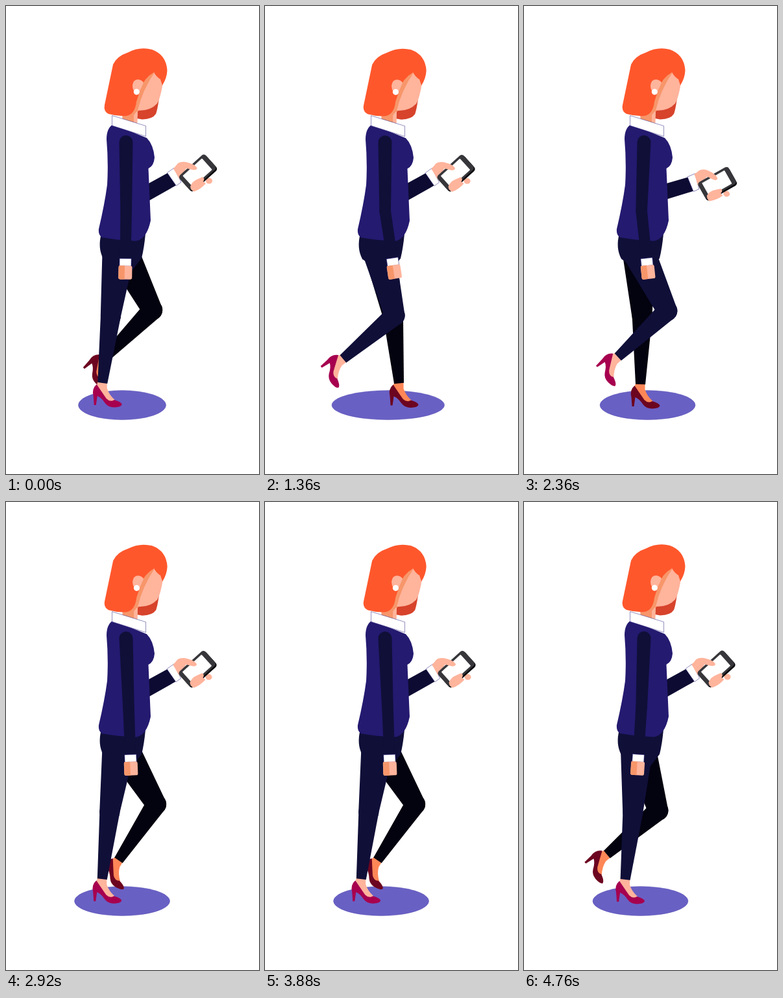
An HTML page for the animation above (4.8 s loop, 390 px wide and 720 px high).

```html
<!DOCTYPE html>
<html lang="en">
<head>
<meta charset="utf-8">
<title>Walking with a phone</title>
<style>
html, body { margin: 0; width: 100%; height: 100%; overflow: hidden; background: #fff; }
svg { display: block; width: 100vw; height: 100vh; }
.navy { fill: #100f38; }
.skin { fill: #ffb49c; }
.tan { fill: #f7966a; }
.white { fill: #fff; stroke: #2a2080; stroke-width: .5; }
</style>
</head>
<body>
<svg viewBox="0 0 390 720">
  <defs>
    <path id="thigh" d="M22 0 L15.5 104 A15.5 15.5 0 0 1 -15.5 108 L-29 4 Q-4 -26 22 0Z"/>
    <path id="shin" d="M-15.5 0 A15.5 15.5 0 0 1 15.5 0 L7.5 104 L-7.5 104Z"/>
    <path id="ankle" d="M-7 -3 L7 -3 L7 8 Q10 18 19 26 Q12 31 4 25 L-9 4Z"/>
    <path id="shoe" d="M-9 2 Q-17 9 -14 20 L-13 34 L-10 34 L-8 20 Q-2 22 4 31 Q9 37.500 18 37.500 Q29 37 30 33 Q29 29 18 26 Q12 30 6 24 Q-3 11 -9 2Z"/>
  </defs>
  <ellipse id="ground" cy="614" ry="22.500" fill="#6960c4" stroke="#5148b0" stroke-width=".5"/>

  <g id="phoneArm">
    <path fill="#0d0b32" d="M196 286 L249 257 L262 276 L216 302 L192 312Z"/>
    <path class="white" d="M248.500 256.500 L259 249 L270 271 L262.500 276.500Z"/>
    <ellipse class="skin" cx="313" cy="269" rx="5" ry="4.500"/>
    <path class="skin" d="M258 250 L265 243 L280 244 L272 262 L267 266Z"/>
    <g transform="translate(295.500 256.300) rotate(-42)">
      <rect x="-27" y="-13" width="54" height="30" rx="4.500" fill="#08080c"/>
      <rect x="-27" y="-15.500" width="54" height="30" rx="4.500" fill="#37373b"/>
      <rect x="-20.500" y="-12" width="40" height="23.500" rx="1" fill="#fff"/>
    </g>
    <path class="skin" d="M258 251 L264 243 Q268 239 277 240 Q291 243 294.500 249 Q294 254 285 251.500 Q277 248 272 252 L265 258Z"/>
    <path class="skin" d="M284 278 Q286 270 296 266 L303 263 Q307 266 304 270 L308 273 Q300 282 290 285.500 Q285 284 284 278Z"/>
  </g>

  <g id="far" fill="#03020f"></g>
  <g id="near" class="navy"></g>

  <g id="body">
    <path class="navy" d="M147 350 L215 350 Q213 372 209 388 L192 410 Q170 405 150 389 Q141 372 147 350Z"/>
    <path fill="#241a70" d="M165 182 Q155 188 155 205 Q158 240 156 275 Q152 305 143 343 Q142 352 148 356 Q170 360 200 361.500 Q217 359 223 330 L219.500 250 Q228 246 229 233 Q227 213 217 203Z"/>
    <g id="arm">
      <path class="navy" d="M-10.500 0 A10.500 10.500 0 0 1 10.500 0 L8.800 106 A8.800 8.800 0 0 1 -8.800 106Z"/>
      <g id="forearm">
        <path class="navy" d="M-8.800 0 A8.800 8.800 0 0 1 8.800 0 L8.300 75 L-8.300 75Z"/>
        <rect class="white" x="-9" y="73" width="18" height="11.500"/>
        <rect class="skin" x="-10.500" y="84" width="21" height="21" rx="2.500"/>
        <path class="tan" d="M-1 84 L-1 105 L-8 105 Q-10.500 105 -10.500 102 L-10 84Z"/>
      </g>
    </g>
  </g>

  <g id="head">
    <path fill="#d7432b" d="M203 150 L237 134 Q234 158 231 166 Q226 174 210 174.500 L202 173Z"/>
    <path class="tan" d="M179 166 L197 158 L203 158 L202 184 L180 180Z"/>
    <path class="skin" d="M197 168 L203 160 L202 184 L197 182Z"/>
    <path class="tan" d="M228 101 Q200 112 196 163 L204 162 L230 120Z"/>
    <path class="skin" d="M229 102 L242 118 Q238 142 233 150 Q222 162 203 160.500 Q210 130 229 102Z"/>
    <path fill="#ff572c" d="M165 90 Q171 77 188 71.500 Q206 62 225 67 Q247 75 248.500 99 Q248 111 241 122 L238 113 Q231 108 228 102 Q212 111 207 129 L201 147 Q199 166 186 169 Q172 170 158 166 Q150 162 152 152Z"/>
    <path class="skin" d="M195 122 Q196 113 204 113 Q210 114 212 118 L205 134 Q195 134 195 122Z"/>
    <circle cx="201.300" cy="132" r="4.600" fill="#fff"/>
  </g>
  <path id="collar" class="white" d="M163.500 168.500 L215.500 184.500 L215.500 200.500 L163.500 184Z"/>
</svg>
<script>
const LOOP = 4800, STEP = 960, FRAME = 40;
const FAR_LAG = 510;
const THIGH = 106, SHIN = 104;
const $ = id => document.getElementById(id);
const wave = (t, peak, period = STEP) => Math.cos(2 * Math.PI * (t - peak) / period);

// Key poses of one stride: [time, degrees], forward is positive
const thighKeys = [[0, -9], [100, -10.5], [270, -14], [400, 12], [450, 25.5], [600, 32], [850, 9.5], [920, -5.5]];
const shinKeys = [[0, -7], [100, -9], [300, -56], [400, -50], [450, -45], [600, -1.7], [700, 11], [850, 5], [920, -6.5]];

// Smooth periodic curve through the keys
function curve(keys, t) {
  const n = keys.length;
  const at = i => {
    const [time, value] = keys[(i + n) % n];
    return [time + Math.floor(i / n) * STEP, value];
  };
  let i = n - 1;
  while (keys[i][0] > t) i--;
  const [a, b, c, d] = [at(i - 1), at(i), at(i + 1), at(i + 2)];
  const h = c[0] - b[0], u = (t - b[0]) / h;
  const m = (c[1] - a[1]) / (c[0] - a[0]) * h;
  const k = (d[1] - b[1]) / (d[0] - b[0]) * h;
  const rise = c[1] - b[1];
  return b[1] + u * (m + u * (3 * rise - 2 * m - k + u * (m + k - 2 * rise)));
}

function makeLeg(id, skin, shoe) {
  $(id).innerHTML = `<g><use href="#ankle" fill="${skin}"/><use href="#shoe" fill="${shoe}"/></g>
    <use href="#shin"/><use href="#thigh"/>`;
  return [...$(id).children];
}
const nearLeg = makeLeg("near", "#ffb49c", "#a6004f");
const farLeg = makeLeg("far", "#ff8757", "#6c0520");

const place = (el, x, y, turn = 0) =>
  el.setAttribute("transform", `translate(${x.toFixed(2)} ${y.toFixed(2)}) rotate(${turn.toFixed(2)})`);

const reach = (x, y, length, deg) => {
  const r = deg * Math.PI / 180;
  return [x + length * Math.sin(r), y + length * Math.cos(r)];
};

function poseLeg([foot, shin, thigh], t, x, y) {
  const upper = curve(thighKeys, t), lower = curve(shinKeys, t);
  const knee = reach(x, y, THIGH, upper);
  const ankle = reach(...knee, SHIN, lower);
  place(thigh, x, y, -upper);
  place(shin, ...knee, -lower);
  // The foot stays flat until the shin tips back
  place(foot, ...ankle, 1.22 * Math.max(0, -lower - 8));
}

function draw(now) {
  const time = Math.floor(now % LOOP / FRAME) * FRAME;
  const t = time % STEP;
  const bob = 1.2 - 1.2 * wave(t, -20, STEP / 2);

  poseLeg(nearLeg, t, 178, 372 + bob);
  poseLeg(farLeg, (t + STEP - FAR_LAG) % STEP, 180, 372 + bob);
  place($("body"), 0, bob * .7);
  place($("head"), bob * .45, bob);
  place($("collar"), 0, bob * .4);

  const upper = -2.1 + 8.5 * wave(t, 200);
  const lower = 1.2 + 11.5 * wave(t, 267);
  place($("arm"), 185, 209.5, -upper);
  place($("forearm"), 0, THIGH, upper - lower);

  // One short dip of the phone per loop
  const near = Math.max(0, 1 - Math.abs(time - 2360) / 340);
  const dip = 12.5 * near * near * (3 - 2 * near);
  const sway = -.2 - 2 * wave(t, 260);
  $("phoneArm").setAttribute("transform",
    `translate(${sway.toFixed(2)} ${(bob * .9).toFixed(2)}) rotate(${dip.toFixed(2)} 222 280)`);

  // The shadow narrows sharply as the legs pass each other
  const closed = (.5 + .5 * wave(t, 0, STEP / 2)) ** 2.5;
  $("ground").setAttribute("cx", (185 + 6 * wave(t, 500)).toFixed(2));
  $("ground").setAttribute("rx", (105 - 37.5 * closed).toFixed(2));
}

const start = performance.now();
function tick() {
  draw(performance.now() - start);
  requestAnimationFrame(tick);
}
tick();
</script>
</body>
</html>
```
